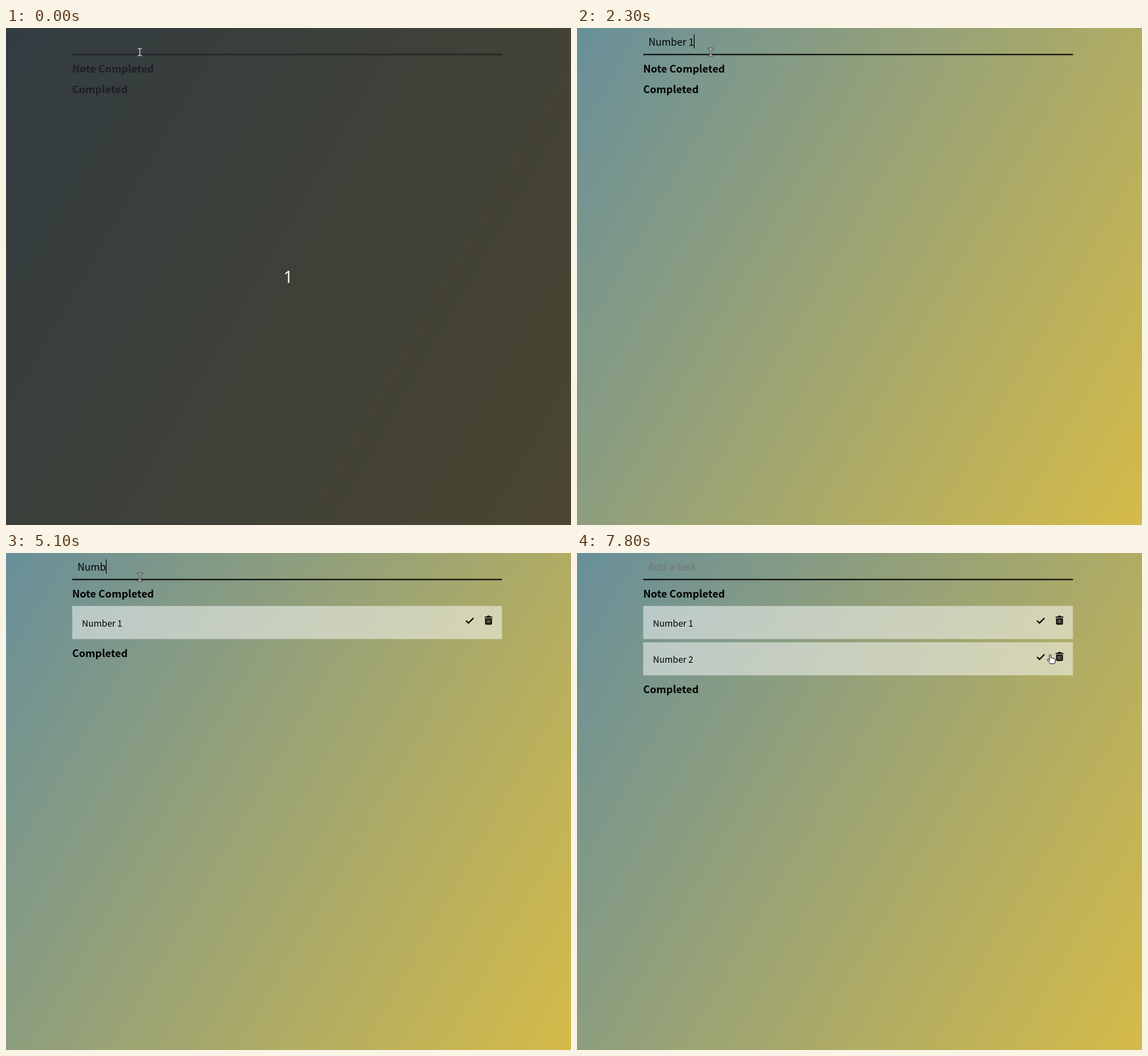
These frames come from a looping animation (798 px wide and 702 px high, 8000 ms). An HTML page:

```html
<!DOCTYPE html>
<html lang="en">
<head>
<meta charset="utf-8">
<title>Task list</title>
<style>
  html, body { margin: 0; width: 100%; height: 100%; overflow: hidden; }
  body { background: linear-gradient(120deg, #688f9a, #d5bb48); }
  svg { display: block; width: 798px; height: 702px; }
  text { font-family: "Noto Sans CJK JP", "Noto Sans CJK SC", "Noto Sans CJK", "Noto Sans", sans-serif; white-space: pre; }
  .heading { font-size: 14.5px; font-weight: 700; }
  .field { font-size: 14px; }
  .item { font-size: 12.4px; }
  .count { font: 24px "Noto Sans", sans-serif; fill: #f1f8e4; text-anchor: middle; }
  .pointer { fill: #fff; stroke: #222; stroke-linejoin: round; }
</style>
</head>
<body>
<svg viewBox="0 0 798 702">
  <defs>
    <g id="tools">
      <path d="M649.7 95.6l3.5 3.3 7-7" fill="none" stroke="#000" stroke-width="1.8"/>
      <path d="M676 89.7h3l1-1.2h3l1 1.2h3v1.6h-11zM676.7 92.2h9.6v7.6q0 1.4-1.4 1.4h-6.8q-1.4 0-1.4-1.4z"/>
      <path d="M679.3 93.7v5.8M681.5 93.7v5.8M683.7 93.7v5.8" stroke="#cfceaa" stroke-width=".8"/>
    </g>
  </defs>

  <text id="hint" class="field" x="101" y="25" fill="#757575">Add a task</text>
  <text id="typed" class="field" x="101" y="25"></text>
  <rect id="caret" y="9" width="1" height="20"/>
  <rect x="93.5" y="36.6" width="607" height="1.7"/>
  <text class="heading" x="93.5" y="63">Note Completed</text>
  <g id="items"></g>
  <text id="done" class="heading" x="93.5">Completed</text>

  <g id="countdown">
    <rect width="798" height="702" fill="#26272a" fill-opacity=".79"/>
    <text class="count" x="398.5" y="360">1</text>
  </g>

  <g id="cursor">
    <g id="beam" fill="none" stroke-linecap="square">
      <path d="M-2.5-5h1.6q.9 0 .9 1v8q0 1-.9 1h-1.6M2.5-5H.9Q0-5 0-4M2.5 5H.9Q0 5 0 4" stroke="#333" stroke-width="2.6"/>
      <path d="M-2.5-5h1.6q.9 0 .9 1v8q0 1-.9 1h-1.6M2.5-5H.9Q0-5 0-4M2.5 5H.9Q0 5 0 4" stroke="#eee"/>
    </g>
    <path id="arrow" class="pointer" d="M-4-7v12l2.8-2.5 1.9 4.3 2-.9-1.9-4.1h3.7z"/>
    <path id="hand" class="pointer" d="M-2.8 2.2V-5.2q0-1.2 1.1-1.2t1.1 1.2v3.6q1.1-.7 1.9.3 1.2-.6 1.9.5 1.6-.6 2.2 1v3q0 2-1.2 3.2H-1.7q-1.3-2.3-3.6-4.6-.9-1.2.1-1.8 1-.5 2.4 1.2z"/>
  </g>
</svg>

<script>
const LOOP = 8000, LEFT = 101, PITCH = 51.3;
const $ = id => document.getElementById(id);
const show = (id, on) => $(id).style.display = on ? "" : "none";

// [start, field text, caret visible, finished items]
const typing = [
  [0, "", false, 0], [400, "N", true, 0], [700, "Nu", true, 0], [1500, "Numb", true, 0],
  [1800, "Numbe", true, 0], [1900, "Number", true, 0], [2000, "Number ", true, 0],
  [2300, "Number 1", true, 0],
  [2700, "", true, 1], [2900, "", false, 1], [3500, "", true, 1],
  [3800, "N", true, 1], [4200, "Nu", true, 1], [4600, "Num", true, 1], [5100, "Numb", true, 1],
  [5600, "Number", true, 1], [5900, "Number ", true, 1], [6000, "Number 2", true, 1],
  [6300, "", true, 2], [6600, "", false, 2], [7200, "", true, 2], [7700, "", false, 2]
];

// [start, shape, x, y]
const moves = [
  [0, "beam", 189, 34], [7000, "beam", 427, 22], [7300, "", 0, 0],
  [7500, "arrow", 585, 62], [7600, "arrow", 646, 114],
  [7700, "hand", 678, 152], [7800, "hand", 670, 150]
];

const at = (track, t) => track.findLast(step => step[0] <= t);

$("items").innerHTML = [1, 2].map((n, i) => `
  <g transform="translate(0 ${i * PITCH})">
    <rect x="93.5" y="74.8" width="607" height="46.7" fill="#fff" fill-opacity=".5"/>
    <text class="item" x="107.3" y="103.5">Number ${n}</text>
    <use href="#tools"/>
  </g>`).join("");

function draw(t) {
  const [, text, caretOn, count] = at(typing, t);
  const [, shape, x, y] = at(moves, t);

  $("typed").textContent = text;
  show("hint", !text && t >= 200);
  show("caret", caretOn);
  const width = text ? $("typed").getComputedTextLength() : 0;
  $("caret").setAttribute("x", Math.floor(LEFT + width));

  [...$("items").children].forEach((item, i) => item.style.display = i < count ? "" : "none");
  $("done").setAttribute("y", 92 + (count ? 3.3 + count * PITCH : 0));

  show("countdown", t < 200);
  for (const id of ["beam", "arrow", "hand"]) show(id, id === shape);
  $("cursor").setAttribute("transform", `translate(${x} ${y})`);
}

const start = performance.now();
function tick() {
  draw((performance.now() - start) % LOOP);
  requestAnimationFrame(tick);
}
tick();
</script>
</body>
</html>
```
